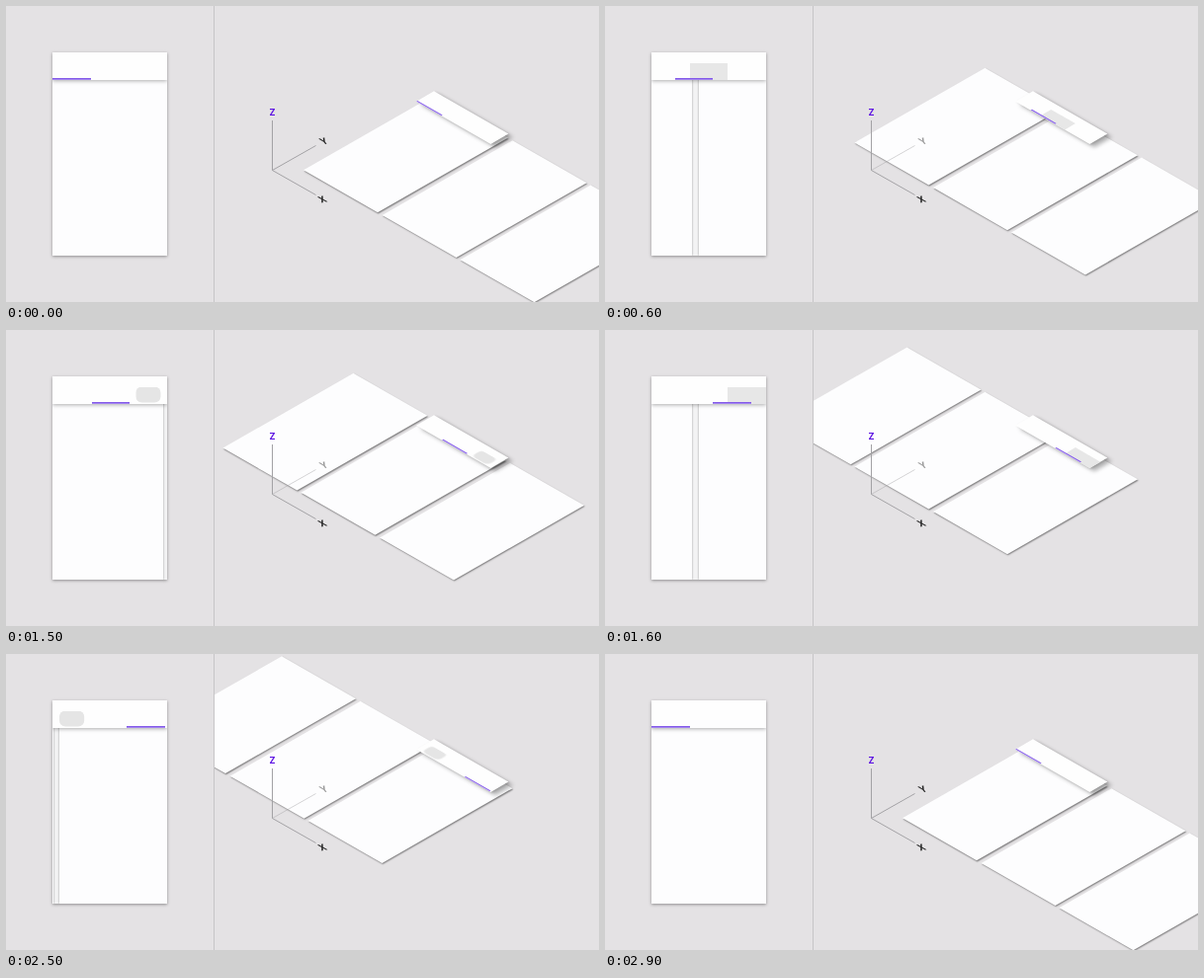
Write an HTML page that moves like this. It is 600 by 300 pixels and loops after 3 s.

```html
<!DOCTYPE html>
<html lang="en">
<head>
<meta charset="utf-8">
<title>Tabs in layers</title>
<style>
@property --page { syntax: "<number>"; inherits: true; initial-value: 0; }

html, body { margin: 0; width: 100%; height: 100%; overflow: hidden; background: #e4e2e4; }

#stage {
  position: relative;
  width: 600px;
  height: 300px;
  overflow: hidden;
  background: #e4e2e4;
  animation: swipe 3s step-end infinite;
}
#stage div { position: absolute; }

/* Ten poses a second, each holding until the next. */
@keyframes swipe {
  0%     { --page: 0; }
  16.66% { --page: .03; }
  20%    { --page: .612; }
  23.33% { --page: .932; }
  26.66% { --page: .995; }
  30%    { --page: 1; }
  50%    { --page: 1.03; }
  53.33% { --page: 1.612; }
  56.66% { --page: 1.932; }
  60%    { --page: 1.995; }
  63.33% { --page: 2; }
  83.33% { --page: 1.94; }
  86.66% { --page: .776; }
  90%    { --page: .136; }
  93.33% { --page: .01; }
  96.66%, 100% { --page: 0; }
}

@keyframes ripple {
  0%     { opacity: 0; }
  16.66% { opacity: 1; clip-path: inset(0 6.5px 1px 7px round 6px); }
  20%    { opacity: .9; clip-path: none; }
  23.33% { opacity: .5; clip-path: none; }
  26.66% { opacity: .2; clip-path: none; }
  30%, 100% { opacity: 0; }
}

.phone { left: 47px; top: 47px; width: 116px; height: 206px; }
.flat { overflow: hidden; background: #f3f3f4; }
.outline { box-shadow: 0 1px 3px rgba(0, 0, 0, .38); }

.page {
  left: calc((var(--i) - var(--page)) * 122.5px);
  width: 116px;
  height: 206px;
  background: #fdfdfe;
  box-shadow: 0 0 2px rgba(0, 0, 0, .38);
}

.bar {
  width: 116px;
  height: 28px;
  background: #fefefe;
  box-shadow: 0 1px 4px rgba(0, 0, 0, .32);
}
.ripple {
  left: calc(var(--i) * 38.67px);
  top: 10.5px;
  width: 38.67px;
  height: 17px;
  background: #e5e5e5;
  opacity: 0;
  animation: ripple 3s step-end infinite;
}
.ripple:nth-child(1) { animation-delay: -1s; }
.ripple:nth-child(3) { animation-delay: -2s; }
.indicator {
  left: calc(var(--page) * 38.67px);
  top: 26px;
  width: 38.67px;
  height: 2px;
  background: linear-gradient(#7444e6, #b39bf2);
}

.scene { left: 210px; top: 0; width: 390px; height: 300px; overflow: hidden; }
.divider { left: 209.5px; top: 0; width: 1px; height: 300px; background: #c6c5c7; }
.plane { left: 0; top: 0; transform-origin: 0 0; }
.ground { transform: matrix(.647, .371, -.641, .368, 223, 90.5); }
.raised { transform: matrix(.65, .373, -.641, .37, 223, 86.3); }
.ground .page { box-shadow: 2px 1px 2px rgba(0, 0, 0, .45); }
.raised .bar { box-shadow: 8px 1px 6px rgba(0, 0, 0, .3), 2px 0 3px rgba(0, 0, 0, .15); }

svg { position: absolute; left: 0; top: 0; }
svg path { stroke: #a3a2a5; stroke-width: 1; fill: none; }
svg text { font: bold 9px Inter, sans-serif; text-anchor: middle; fill: #222; }
svg .up { fill: #5b10e2; }
.behind { opacity: calc(1 - .55 * min(1, var(--page) / .6)); }
</style>
</head>
<body>
<div id="stage">
  <div class="phone outline"></div>
  <div class="phone flat">
    <div class="page" style="--i: 0"></div>
    <div class="page" style="--i: 1"></div>
    <div class="page" style="--i: 2"></div>
    <div class="bar">
      <div class="ripple" style="--i: 0"></div>
      <div class="ripple" style="--i: 1"></div>
      <div class="ripple" style="--i: 2"></div>
      <div class="indicator"></div>
    </div>
  </div>

  <div class="scene">
    <div class="plane ground">
      <div class="page" style="--i: 0"></div>
      <div class="page" style="--i: 1"></div>
      <div class="page" style="--i: 2"></div>
    </div>
    <div class="plane raised">
      <div class="bar">
        <div class="ripple" style="--i: 0"></div>
        <div class="ripple" style="--i: 1"></div>
        <div class="ripple" style="--i: 2"></div>
        <div class="indicator"></div>
      </div>
    </div>
  </div>
  <div class="divider"></div>

  <svg width="600" height="300">
    <path d="M269.5 116V166.5L313.5 191.5"/>
    <text class="up" x="269.5" y="110.8">Z</text>
    <text transform="matrix(1 -.2 .7 .9 320 196)" y="3.2">X</text>
    <g class="behind">
      <path d="M269.5 166.5L313.5 141.5"/>
      <text transform="matrix(1 -.2 .7 .9 321.5 137)" y="3.2">Y</text>
    </g>
  </svg>
</div>
</body>
</html>
```
